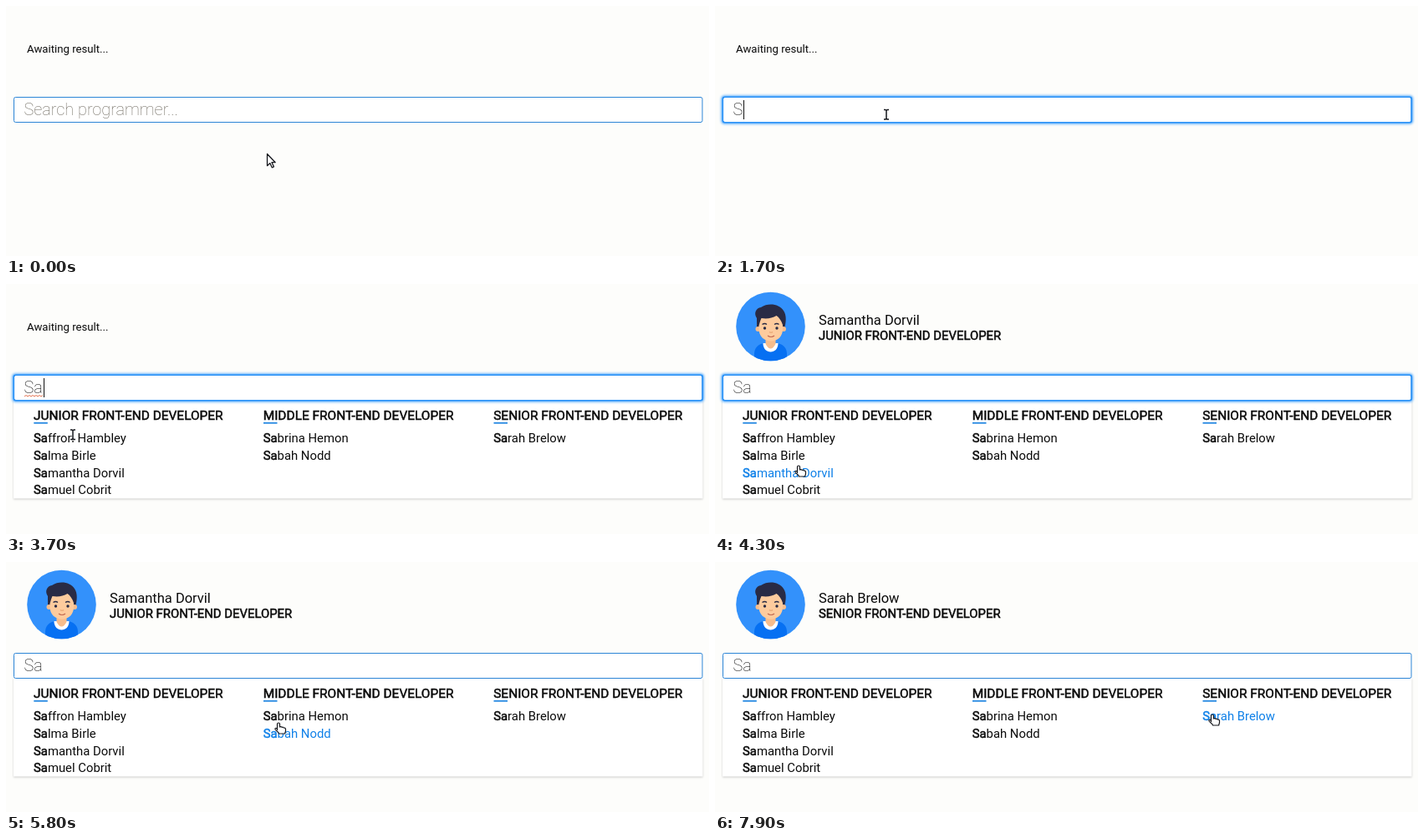
Animation, 841 px wide and 300 px high, one loop 8 s. Source, as an HTML page:

```html
<!DOCTYPE html>
<html lang="en">
<head>
<meta charset="utf-8">
<title>Programmer search</title>
<style>
  html, body { margin: 0; width: 100%; height: 100%; overflow: hidden; background: #fdfdfb; }
  svg { position: absolute; left: 0; top: 0; display: block; }
  text { font-family: Roboto, sans-serif; fill: #0b0b0b; white-space: pre; }
  .wait { font-size: 13.2px; }
  .name { font-size: 16.5px; }
  .role { font-size: 14.87px; }
  .head { font-size: 15.45px; }
  .item { font-size: 14.85px; }
  .role, .head, .match { stroke: #0b0b0b; stroke-width: .5px; }
  .item.hot, .hot .match { fill: #0f80e8; }
  .hot .match { stroke: #0f80e8; }
  .query { font-size: 19.9px; font-weight: 100; fill: #111; }
  .query.empty { fill: #6f6a60; }
  .box { fill: #fff; stroke: #2b84d6; }
  .glow { fill: #4aa5fb; filter: blur(1.6px); }
  .ring { fill: none; stroke: #2a92f7; stroke-width: 1.6; }
  .panel { fill: #fff; filter: drop-shadow(0 1px 1px rgba(0, 0, 0, .2)); }
</style>
</head>
<body>
<svg id="stage" width="841" height="300" viewBox="0 0 841 300">
  <text id="wait" class="wait" x="25" y="56">Awaiting result...</text>
  <g id="profile">
    <clipPath id="disc"><circle cx="66.5" cy="51" r="41.3"/></clipPath>
    <circle cx="66.5" cy="51" r="41.3" fill="#3391fb"/>
    <g clip-path="url(#disc)">
      <path d="M47 93V84c0-8 5-12 12-13h15c7 1 12 5 12 13v9z" fill="#0670f2"/>
      <path d="M57.5 71c0 14 18 14 18 0z" fill="#fff"/>
      <path d="M60.500 60h12v12q-6 11-12 0z" fill="#f6bd8d"/>
      <path d="M50 54V41c-4-6-1-12 5-13 9-6 22-4 27 4 4 6 3 14 1 22z" fill="#292b45"/>
      <circle cx="51.500" cy="54" r="3" fill="#f6bd8d"/>
      <circle cx="82" cy="54" r="3" fill="#f6bd8d"/>
      <path d="M52.500 50c1-4 2-7 3-9 7 1 13 0 18-3 3 2 6 6 7.500 11v5c0 9-6 14.500-14 14.500S52.500 63 52.500 54z" fill="#fdcb9d"/>
      <path d="M56.500 48.500q3-2 5.500 0M71 48.500q3-2 5.500 0" fill="none" stroke="#292b45" stroke-width="1.300"/>
      <circle cx="59.500" cy="53" r="1.700" fill="#292b45"/>
      <circle cx="74" cy="53" r="1.700" fill="#292b45"/>
      <path d="M65 57.500q2 1.500 4 0" fill="none" stroke="#e9a674" stroke-width="1.200"/>
      <path d="M63 62q4 3 8 0" fill="none" stroke="#c2684f" stroke-width="1.200"/>
    </g>
    <text id="who" class="name" x="124" y="48.800"></text>
    <text id="job" class="role" x="124" y="66.500"></text>
  </g>
  <g id="lists"></g>
  <rect id="glow" class="glow" x="7.500" y="107.500" width="827.500" height="34" rx="4"/>
  <rect class="box" x="9.500" y="109.500" width="823.500" height="30" rx="2"/>
  <rect id="ring" class="ring" x="9.300" y="109.300" width="824" height="30.500" rx="2.500"/>
  <text id="query" class="query" x="21.500" y="131"></text>
  <path id="wavy" d="M22 135l2-1.500 2 1.500 2-1.500 2 1.500 2-1.500 2 1.500 2-1.500 2 1.500 2-1.500 2 1.500 2-1.500" fill="none" stroke="#e2714f"/>
  <rect id="caret" y="113" width="1" height="23" fill="#111"/>
  <g id="pointer" stroke-linejoin="round">
    <path id="arrow" d="M.5 .5v14.200l3.300-3.100 2.400 5.200 2.200-1-2.400-5.100h4.200z" fill="#fff" stroke="#15171c" stroke-width="1.300"/>
    <g id="beam" fill="none">
      <path d="M-3-5.500h2l1 1 1-1h2M-3 6h2l1-1 1 1h2M0-4.500V5" stroke="#fff" stroke-width="2.800"/>
      <path d="M-3-5.500h2l1 1 1-1h2M-3 6h2l1-1 1 1h2M0-4.500V5" stroke="#15171c" stroke-width="1.500"/>
    </g>
    <path id="hand" d="M-1.500 7.500V.5a1.500 1.500 0 0 1 3 0V4c.8-.7 2.200-.6 2.600.4.900-.5 2-.2 2.400.7 1-.3 2 .3 2 1.400v2c0 1.500-.8 2-.8 3.500H.5c0-1.600-3-3-4.300-5-.9-1.500.8-2.400 2.300-.5z" fill="#fff" stroke="#15171c" stroke-width="1.200"/>
  </g>
</svg>
<script>
const LOOP = 8000, STEP = 100, ROW = 20.6, TOP = 175;
const columns = [
  { x: 33, role: 'JUNIOR FRONT-END DEVELOPER',
    people: ['Saffron Hambley', 'Salma Birle', 'Samantha Dorvil', 'Samuel Cobrit', 'Stella Corwin'] },
  { x: 307.7, role: 'MIDDLE FRONT-END DEVELOPER',
    people: ['Sabrina Hemon', 'Sabah Nodd', 'Silas Brome'] },
  { x: 583.2, role: 'SENIOR FRONT-END DEVELOPER',
    people: ['Sarah Brelow', 'Sylvie Tranter'] }
];
// time, x, y of the pointer's hot spot
const path = [
  [200, 312, 177], [500, 268, 158], [700, 205, 130],
  [3400, 205, 130], [3600, 150, 138], [3700, 80, 180.5], [4100, 100, 219],
  [4900, 100, 219], [5200, 140, 214], [5500, 240, 203], [5700, 309, 197], [5800, 326, 194], [6100, 338, 184],
  [6800, 338, 184], [6900, 380, 192], [7000, 460, 198], [7100, 543.5, 194.5], [7300, 584, 188], [7500, 595, 184]
];

const $ = id => document.getElementById(id);
const show = (id, on) => { $(id).style.display = on ? '' : 'none'; };
const clamp = v => Math.max(0, Math.min(1, v));
const within = (t, ...spans) => spans.some(([a, b]) => t >= a && t < b);

function add(parent, tag, attrs, text = '') {
  const el = document.createElementNS('http://www.w3.org/2000/svg', tag);
  for (const key in attrs) el.setAttribute(key, attrs[key]);
  el.textContent = text;
  return parent.appendChild(el);
}

function buildList(query) {
  const group = add($('lists'), 'g', {});
  const found = columns.map(c => c.people.filter(p => p.startsWith(query)));
  const rows = Math.max(...found.map(f => f.length));
  add(group, 'rect', { class: 'panel', x: 9, y: 139, width: 824.5, height: 36 + rows * ROW });
  const items = columns.map((col, i) => {
    add(group, 'text', { class: 'head', x: col.x, y: 162.5 }, col.role);
    add(group, 'rect', { x: col.x + .3, y: 166, width: 16.5, height: 1.6, fill: '#1680e0' });
    return found[i].map((person, r) => {
      const item = add(group, 'text', { class: 'item', x: col.x, y: 190.4 + r * ROW });
      add(item, 'tspan', { class: 'match' }, query);
      add(item, 'tspan', {}, person.slice(query.length));
      return item;
    });
  });
  return { group, items };
}
const lists = { S: buildList('S'), Sa: buildList('Sa') };

function pointerAt(t) {
  const next = path.findIndex(p => p[0] > t);
  if (next === 0) return path[0].slice(1);
  if (next < 0) return path[path.length - 1].slice(1);
  const [a, b] = [path[next - 1], path[next]];
  const k = (t - a[0]) / (b[0] - a[0]);
  return [a[1] + (b[1] - a[1]) * k, a[2] + (b[2] - a[2]) * k];
}

function draw(t) {
  const query = t < 1700 ? '' : t < 2100 ? 'S' : 'Sa';
  const open = t < 1900 ? '' : t < 2300 ? 'S' : 'Sa';
  const [x, y] = pointerAt(t);
  // the page reacts one step behind the pointer
  const [px, py] = pointerAt(t - STEP);
  let kind = py > 108 && py < 141 ? 'beam' : 'arrow';

  for (const key in lists) {
    lists[key].group.style.display = key === open ? '' : 'none';
    lists[key].items.forEach((col, c) => col.forEach((item, r) => {
      const dx = px - columns[c].x, top = TOP + r * ROW;
      const hot = key === open && dx >= 0 && dx < 257 && py >= top && py < top + ROW;
      item.classList.toggle('hot', hot);
      if (hot && dx < item.getComputedTextLength()) kind = 'hand';
    }));
  }

  $('query').textContent = query || 'Search programmer...';
  $('query').classList.toggle('empty', !query);
  const focus = clamp((t - 600) / 200) * clamp((4500 - t) / 200);
  $('ring').style.opacity = $('glow').style.opacity = focus;
  show('wavy', within(t, [3100, 4300]));
  show('caret', within(t, [800, 1400], [1700, 2700], [3300, 3800]));
  $('caret').setAttribute('x', [22, 34, 45][query.length]);

  const pick = t < 6400 ? [0, 2] : t < 7900 ? [1, 0] : [2, 0];
  show('wait', t < 4300);
  show('profile', t >= 4300);
  $('who').textContent = columns[pick[0]].people[pick[1]];
  $('job').textContent = columns[pick[0]].role;

  for (const id of ['arrow', 'beam', 'hand']) show(id, id === kind);
  $('pointer').setAttribute('transform', `translate(${x} ${y})`);
}

const start = performance.now();
function tick() {
  const t = (performance.now() - start) % LOOP;
  draw(Math.floor(t / STEP) * STEP);
  requestAnimationFrame(tick);
}
tick();
</script>
</body>
</html>
```
